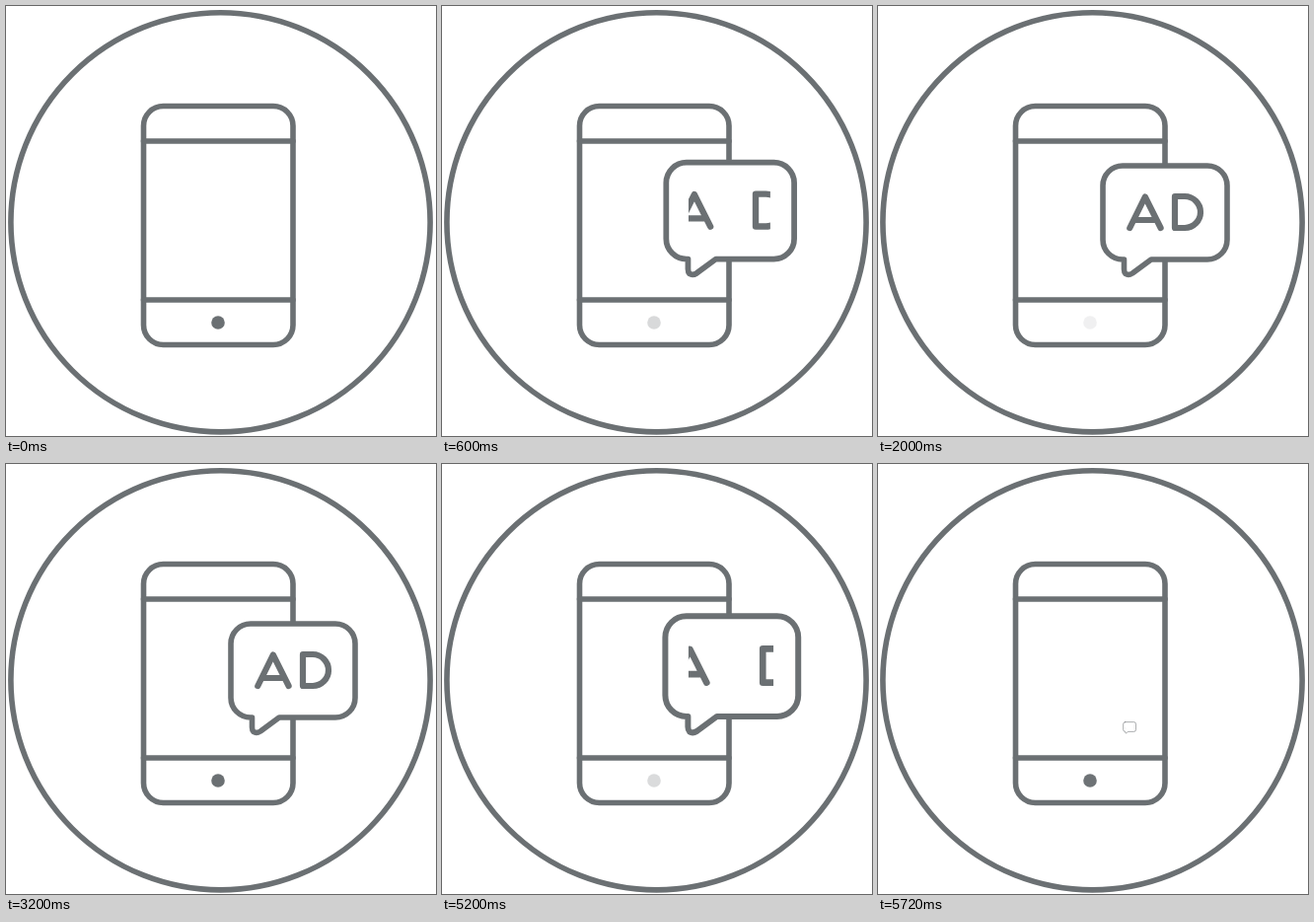
Write an HTML page with a canvas that moves like this. It is 436 px wide and 436 px high and loops after 5.76 s.

```html
<!DOCTYPE html>
<html lang="en">
<head>
<meta charset="utf-8">
<title>Mobile ad</title>
<style>
  html, body { margin: 0; width: 100%; height: 100%; overflow: hidden; background: #fff; }
  canvas { display: block; width: 100%; height: 100%; }
</style>
</head>
<body>
<canvas id="stage"></canvas>
<script>
const SIZE = 436, LOOP = 5760, STEP = 40;
const INK = '#6b7073';
const canvas = document.getElementById('stage');
const ctx = canvas.getContext('2d');
const dpr = window.devicePixelRatio || 1;
canvas.width = canvas.height = SIZE * dpr;

// Bubble size by time since it appeared, [ms, scale]
const POP = [[0, 0], [360, 0.92], [460, 1.1], [520, 1.1], [560, 1.07], [600, 1.03], [650, 1]];
// Home button fades: [start, faintest, end]
const BLINKS = [[0, 470, 960], [1560, 2050, 2600], [3200, 3680, 4160], [4840, 5320, 5730]];
const TAIL = { x: 251, y: 273 };

function lerpKeys(keys, t) {
  for (let i = 1; i < keys.length; i++) {
    const [t0, v0] = keys[i - 1], [t1, v1] = keys[i];
    if (t < t1) return v0 + (v1 - v0) * (t - t0) / (t1 - t0);
  }
  return keys[keys.length - 1][1];
}

function smooth(from, to, t) {
  const x = Math.min(1, Math.max(0, (t - from) / (to - from)));
  return x * x * (3 - 2 * x);
}

function stroke(build) {
  ctx.beginPath();
  build();
  ctx.stroke();
}

function line(x0, y0, x1, y1) {
  ctx.moveTo(x0, y0);
  ctx.lineTo(x1, y1);
}

function dotAlpha(t) {
  const blink = BLINKS.find(([start, , end]) => t >= start && t < end);
  if (!blink) return 1;
  const [start, mid, end] = blink;
  return t < mid ? (mid - t) / (mid - start) : (t - mid) / (end - mid);
}

function drawPhone(t) {
  ctx.lineWidth = 5.6;
  stroke(() => ctx.arc(217.5, 219.3, 212.6, 0, Math.PI * 2));
  stroke(() => ctx.roundRect(139.5, 101.5, 151.5, 242, 20));
  stroke(() => {
    line(139.5, 137, 291, 137);
    line(139.5, 298, 291, 298);
  });
  ctx.globalAlpha = dotAlpha(t);
  ctx.beginPath();
  ctx.arc(215, 321, 6.8, 0, Math.PI * 2);
  ctx.fillStyle = INK;
  ctx.fill();
  ctx.globalAlpha = 1;
}

function bubblePath() {
  const l = 228, r = 354, t = 162, b = 257, rad = 20;
  ctx.beginPath();
  ctx.moveTo(l + rad, t);
  ctx.arcTo(r, t, r, b, rad);
  ctx.arcTo(r, b, l, b, rad);
  ctx.lineTo(277, b);
  ctx.lineTo(258, 271);
  ctx.quadraticCurveTo(254, 273.5, 251, 271.5);
  ctx.quadraticCurveTo(249.5, 270, 249.5, 267);
  ctx.lineTo(249.5, b);
  ctx.arcTo(l, b, l, t, rad);
  ctx.arcTo(l, t, r, t, rad);
  ctx.closePath();
}

function drawLetters(shift) {
  ctx.beginPath();
  ctx.rect(250, 180, 80.5, 56);
  ctx.clip();
  ctx.lineWidth = 6.2;
  ctx.translate(-shift, 0);
  stroke(() => {
    ctx.moveTo(255.3, 225);
    ctx.lineTo(270.8, 193.5);
    ctx.lineTo(286.6, 225);
    line(260, 217, 282, 217);
  });
  ctx.translate(shift * 2, 0);
  stroke(() => {
    ctx.moveTo(301, 193);
    ctx.lineTo(311, 193);
    ctx.arc(311, 209, 16, -Math.PI / 2, Math.PI / 2);
    ctx.lineTo(301, 225);
    ctx.closePath();
  });
}

function drawBubble(age) {
  const scale = lerpKeys(POP, age);
  if (scale <= 0) return;
  ctx.save();
  ctx.translate(TAIL.x, TAIL.y);
  ctx.scale(scale, scale);
  ctx.translate(-TAIL.x, -TAIL.y);
  bubblePath();
  ctx.fillStyle = '#fff';
  ctx.fill();
  ctx.lineWidth = 5.6;
  ctx.stroke();
  drawLetters(41 * (1 - smooth(270, 830, age)));
  ctx.restore();
}

function frame() {
  const t = Math.floor(performance.now() % LOOP / STEP) * STEP;
  ctx.setTransform(dpr, 0, 0, dpr, 0, 0);
  ctx.fillStyle = '#fff';
  ctx.fillRect(0, 0, SIZE, SIZE);
  ctx.strokeStyle = INK;
  ctx.lineCap = ctx.lineJoin = 'round';
  drawPhone(t);
  // The exit mirrors the entrance
  drawBubble(Math.min(t, LOOP - t));
  requestAnimationFrame(frame);
}
frame();
</script>
</body>
</html>
```
